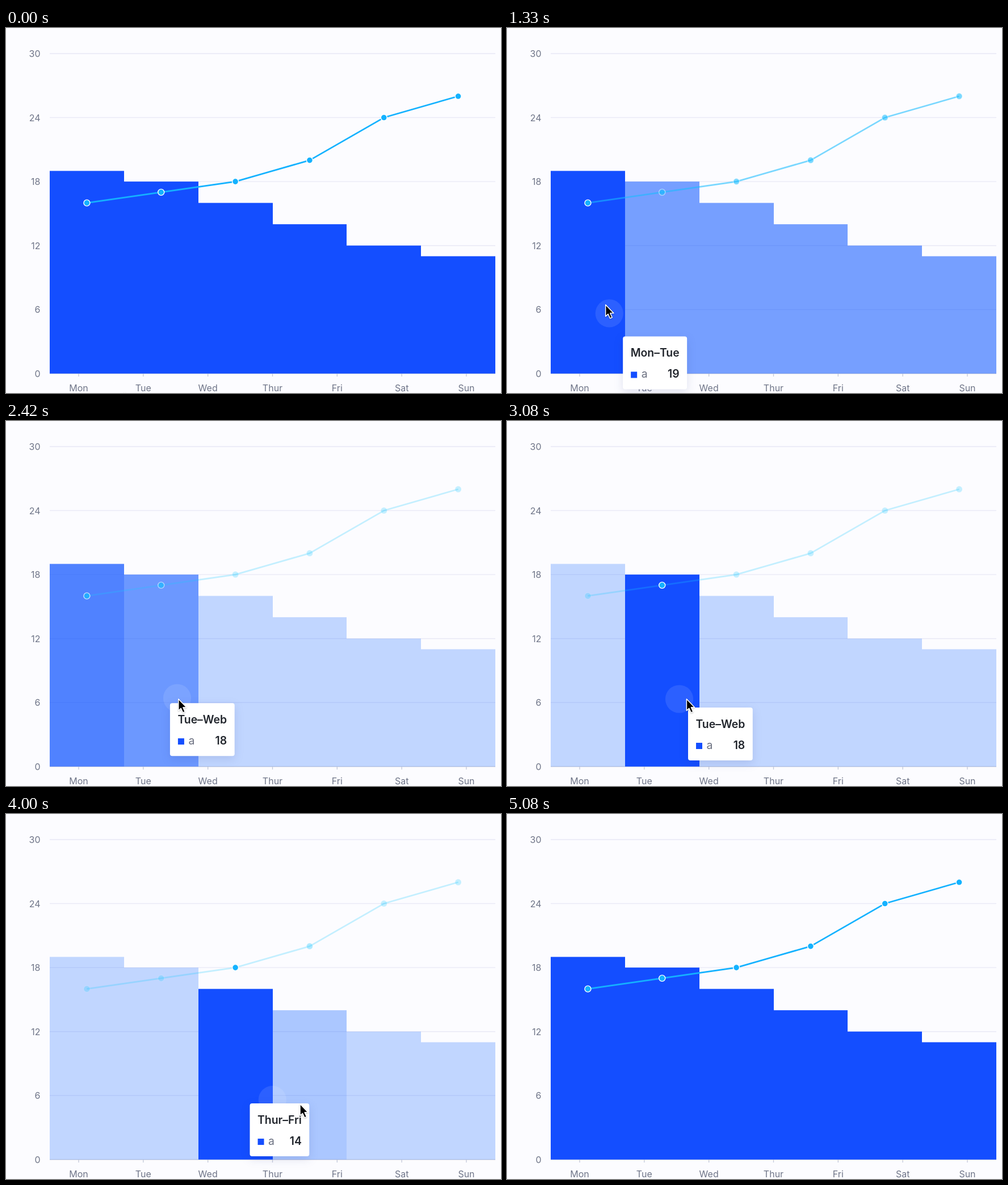
These frames come from a looping animation (872x642 px, 5.51 s). An HTML page:

```html
<!DOCTYPE html>
<html lang="en">
<head>
<meta charset="utf-8">
<title>Histogram with hover</title>
<style>
  html, body { margin: 0; width: 100%; height: 100%; overflow: hidden; background: #fcfcff; }
  svg { display: block; font-family: Inter, Roboto, "Liberation Sans", sans-serif; }
  .axis text { font-size: 16px; fill: #6f7588; }
  .grid { stroke: #e9e9f6; stroke-width: 1.4; }
  .base { stroke: #c3c8d8; stroke-width: 1.3; }
  #line { fill: none; stroke-width: 2.7; stroke-linejoin: round; }
  #halo { fill: #fff; fill-opacity: .1; }
  #panel { fill: #fff; filter: drop-shadow(0 5px 8px rgba(20, 40, 120, .13)); }
  #tip text { font-size: 19.4px; fill: #21252c; font-weight: 600; }
  #tip .key { font-weight: 400; fill: #6b7080; }
  #pointer { fill: #000; stroke: #fff; stroke-width: 1.5; stroke-linejoin: round;
    filter: drop-shadow(0 1px 1px rgba(0, 0, 0, .25)); }
</style>
</head>
<body>
<svg width="872" height="642" viewBox="0 0 872 642">
  <g class="axis" id="axis"></g>
  <g id="bars"></g>
  <path id="line"/>
  <g id="dots"></g>
  <circle id="halo" r="24.6"/>
  <g id="tip">
    <rect id="panel" height="93" rx="4"/>
    <text id="title" x="13.5" y="35.5"></text>
    <rect x="14" y="62" width="11" height="11" fill="#144eff"/>
    <text class="key" x="32.5" y="72.5">a</text>
    <text id="value" y="72.5" text-anchor="end"></text>
  </g>
  <path id="pointer" d="M.8 1V21.5L5.2 17.4L8.7 25L12.3 23.4L8.9 15.8H15Z"/>
</svg>
<script>
const LOOP = 5510, FPS = 12, FADE = 250, OUT_DELAY = 30;
const LEFT = 77, RIGHT = 862, BASE = 607.8, UNIT = 18.76;
const HALO_LAG = 68, TIP_LAG = 150, PAD = 13.5;
const BAR = { on: [20, 78, 255], off: [16, 100, 255] };
const LINE = { on: [20, 178, 255], off: [26, 198, 255] };

const days = ['Mon', 'Tue', 'Wed', 'Thur', 'Fri', 'Sat', 'Sun'];
const barValues = [19, 18, 16, 14, 12, 11];
const lineValues = [16, 17, 18, 20, 24, 26];
const titles = ['Mon–Tue', 'Tue–Web', 'Wed–Thur', 'Thur–Fri'];

const smooth = u => u * u * (3 - 2 * u);
const out = u => 1 - (1 - u) ** 3;
const rush = u => u ** 1.15;

// Each move glides the pointer to (x, y); some change the hovered bar at `enter`.
const origin = [208, 640];
const moves = [
  { at: 83, dur: 334, x: 197, y: 621, easeX: out, easeY: out },
  { at: 1000, dur: 700, x: 145, y: 463, easeX: smooth, easeY: out, enter: 1160, bar: 0 },
  { at: 2000, dur: 370, x: 303, y: 488, easeX: smooth, easeY: rush, enter: 2298, bar: 1 },
  { at: 3000, dur: 328, x: 381, y: 488, easeX: smooth, easeY: smooth, enter: 3250, bar: 2 },
  { at: 3750, dur: 370, x: 562, y: 516, easeX: smooth, easeY: smooth, enter: 3970, bar: 3 },
  { at: 4583, dur: 250, x: 1081, y: 705, easeX: rush, easeY: rush, enter: 4740, bar: -1 }
];
const hovers = moves.filter(m => m.enter);

const $ = id => document.getElementById(id);
const clamp = v => Math.max(0, Math.min(1, v));
const mix = (a, b, p) => a + (b - a) * p;
const yOf = v => BASE - v * UNIT;
const step = (RIGHT - LEFT) / barValues.length;
const place = (el, x, y) => el.setAttribute('transform', `translate(${x.toFixed(2)} ${y.toFixed(2)})`);

function add(parent, tag, attrs, text) {
  const el = document.createElementNS('http://www.w3.org/2000/svg', tag);
  for (const k in attrs) el.setAttribute(k, attrs[k]);
  if (text !== undefined) el.textContent = text;
  return parent.appendChild(el);
}

for (let v = 0; v <= 30; v += 6) {
  const y = yOf(v);
  add($('axis'), 'line', { class: v ? 'grid' : 'base', x1: LEFT, x2: RIGHT, y1: y, y2: y });
  add($('axis'), 'text', { x: 60.5, y: y + 6, 'text-anchor': 'end' }, v);
}
days.forEach((day, i) => {
  const x = 128 + i * 113.83;
  add($('axis'), 'line', { class: 'base', x1: x, x2: x, y1: 608, y2: 613 });
  add($('axis'), 'text', { x, y: 638.5, 'text-anchor': 'middle' }, day);
});

// Whole-pixel sides keep neighbouring bars free of seams.
const edge = i => Math.round(LEFT + i * step);
const bars = barValues.map((v, i) => add($('bars'), 'rect',
  { x: edge(i), y: yOf(v), width: edge(i + 1) - edge(i), height: v * UNIT }));
const points = lineValues.map((v, i) => [LEFT + (i + .5) * step, yOf(v)]);
$('line').setAttribute('d', 'M' + points.join('L'));
const dots = points.map(([cx, cy]) =>
  add($('dots'), 'circle', { cx, cy, r: 5.5, stroke: '#fff', 'stroke-width': 1.4 }));

function pointerAt(t) {
  let [x, y] = origin;
  for (const m of moves) {
    const u = clamp((t - m.at) / m.dur);
    x = mix(x, m.x, m.easeX(u));
    y = mix(y, m.y, m.easeY(u));
  }
  return [x, y];
}

function shade({ on, off }, level) {
  const rgb = on.map((c, k) => Math.round(mix(off[k], c, level)));
  return `rgba(${rgb},${mix(.25, 1, level).toFixed(3)})`;
}

// 1 is fully lit, 0 is dimmed; index -1 stands for the line itself.
function levelAt(i, t) {
  let level = 1;
  for (const { enter, bar } of hovers) {
    const goal = bar < 0 || bar === i ? 1 : 0;
    const delay = goal ? 0 : OUT_DELAY;
    level = mix(level, goal, clamp((t - enter - delay) / FADE));
  }
  return level;
}

function drawTip(t) {
  const hover = hovers.filter(m => m.enter <= t).pop();
  const shown = hover && hover.bar >= 0;
  $('tip').style.display = shown ? '' : 'none';
  if (!shown) return;
  const [x, y] = pointerAt(t - TIP_LAG);
  place($('tip'), x + 16, y + 16);
  $('title').textContent = titles[hover.bar];
  $('value').textContent = barValues[hover.bar];
  const width = $('title').getComputedTextLength();
  $('panel').setAttribute('width', width + 2 * PAD);
  $('value').setAttribute('x', width + PAD);
}

function draw(t) {
  bars.forEach((bar, i) => bar.setAttribute('fill', shade(BAR, levelAt(i, t))));
  dots.forEach((dot, i) => {
    const level = levelAt(i, t);
    dot.setAttribute('fill', shade(LINE, level));
    dot.setAttribute('stroke-opacity', mix(.15, 1, level));
  });
  $('line').setAttribute('stroke', shade(LINE, levelAt(-1, t)));

  const [hx, hy] = pointerAt(t - HALO_LAG);
  place($('halo'), hx, hy + 1);
  place($('pointer'), ...pointerAt(t));
  drawTip(t);
}

const began = performance.now();
function tick() {
  const t = (performance.now() - began) % LOOP;
  draw(Math.floor((t + 4) * FPS / 1000) * 1000 / FPS);
  requestAnimationFrame(tick);
}
tick();
</script>
</body>
</html>
```
